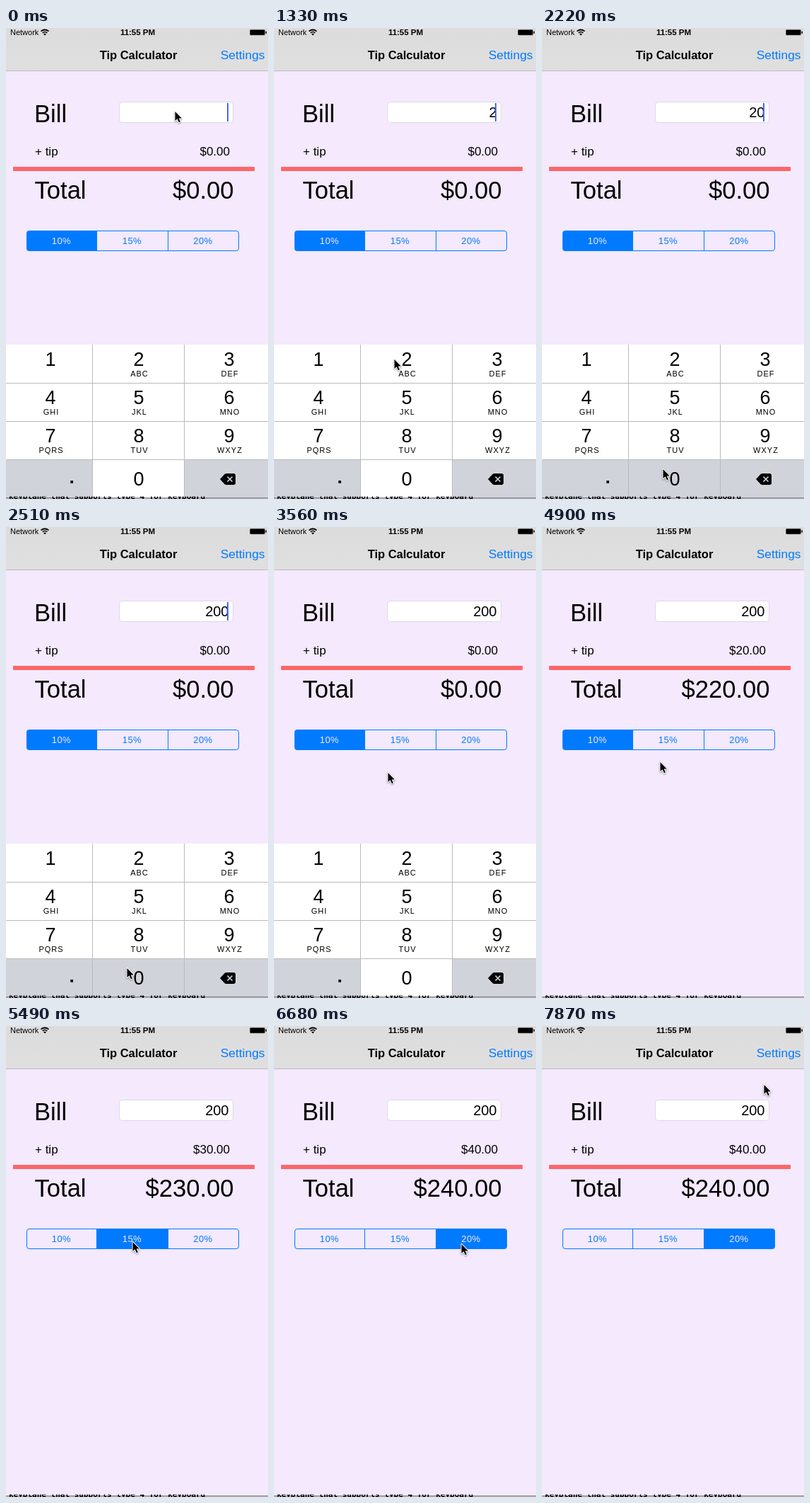
An HTML page that plays this animation: 371 px wide and 665 px high, repeating every 8 s.

```html
<!DOCTYPE html>
<html lang="en">
<head>
<meta charset="utf-8">
<title>Tip Calculator</title>
<style>
  html, body { margin: 0; width: 100%; height: 100%; overflow: hidden; background: #f4e9fd; }
  svg { display: block; width: 371px; height: 665px; font-family: "Liberation Sans", Arial, sans-serif; }
  .end { text-anchor: end; }
  .mid, .digit, .letters, .segment text { text-anchor: middle; }
  .bold { font-weight: bold; }
  .big { font-size: 34.6px; }
  .body { font-size: 17px; }
  .digit { font-size: 27px; }
  .letters { font-size: 11px; letter-spacing: 1px; }
  .segment text { font-size: 13px; letter-spacing: .4px; fill: #007aff; }
  .segment path { fill: none; }
  .segment.on path { fill: #007aff; }
  .segment.on text { fill: #f4e9fd; }
  .console { font: bold 11px "DejaVu Sans Mono", monospace; }
  #cursor { filter: drop-shadow(0 1px .8px #0006); }
</style>
</head>
<body>
<svg viewBox="0 0 371 665">
  <defs>
    <linearGradient id="barFill" x2="0" y2="1">
      <stop stop-color="#dcdcdc"/><stop offset="1" stop-color="#e0dfe0"/>
    </linearGradient>
    <clipPath id="screen"><path d="M0 0H371V663H0Z"/></clipPath>
    <clipPath id="bottomEdge"><path d="M0 661.5H371V665H0Z"/></clipPath>
    <clipPath id="pill"><rect x="29" y="286" width="301" height="29" rx="4"/></clipPath>
  </defs>
  <path d="M0 0H371V665H0Z" fill="#f4e9fd"/>

  <path d="M0 0H371V60H0Z" fill="url(#barFill)"/>
  <path d="M0 60.5H371" stroke="#bdb9c1"/>
  <text x="6" y="10" font-size="11">Network</text>
  <g fill="none" stroke="#000" stroke-width="1.7">
    <path d="M49.5 4.7Q55 .3 60.5 4.7M51.7 6.8Q55 4.2 58.3 6.8"/>
  </g>
  <path d="M55 10.5L53 8.4Q55 7 57 8.4Z"/>
  <text class="mid bold" x="186.5" y="10" font-size="11.5">11:55 PM</text>
  <rect x="345.5" y="2.5" width="21" height="7.5" rx="1.2" stroke="#555" stroke-width=".6"/>
  <path d="M367.5 4.8H369V7.8H367.5Z"/>
  <text class="mid bold" x="187.5" y="44" font-size="16.5">Tip Calculator</text>
  <text class="end" x="366.5" y="44" font-size="17.4" fill="#007aff">Settings</text>

  <text class="big" x="40" y="133">Bill</text>
  <rect x="160.5" y="104.5" width="161" height="29" rx="4" fill="#fff" stroke="#dfd8e6"/>
  <text id="bill" class="end" x="315.5" y="126" font-size="20"></text>
  <path id="caret" d="M313 106H315V132H313Z" fill="#426bf2"/>
  <text class="body" x="41" y="180">+ tip</text>
  <text id="tip" class="body end" x="317" y="180"></text>
  <path d="M10 196H352V202H10Z" fill="#fb6669"/>
  <text class="big" x="40.5" y="241">Total</text>
  <text id="total" class="big end" x="322.5" y="241"></text>

  <g id="segments" clip-path="url(#pill)"></g>
  <path d="M128.5 287V314M229.5 287V314" stroke="#007aff"/>
  <rect x="29.5" y="286.5" width="300" height="28" rx="3.5" fill="none" stroke="#007aff"/>

  <g clip-path="url(#screen)"><g id="keyboard"></g></g>
  <path d="M0 663H371V665H0Z" fill="#c5c1c9"/>
  <path d="M0 663.5H371" stroke="#77747a"/>
  <text class="console" x="4" y="664.5" clip-path="url(#bottomEdge)">keyplane that supports type 4 for keyboard</text>

  <path id="cursor" d="M.5 1V14L3.6 11.2L5.9 16.3L7.9 15.4L5.7 10.4H9.8Z"
        stroke="#fff" stroke-width="2" paint-order="stroke" stroke-linejoin="round"/>
</svg>
<script>
const LOOP = 8000, TICK = 148.2;
const $ = id => document.getElementById(id);

const segments = [[29.5, 128.5, "10%"], [128.5, 229.5, "15%"], [229.5, 329.5, "20%"]];
$("segments").innerHTML = segments.map(([left, right, label]) =>
  `<g class="segment"><path d="M${left} 286.5H${right}V314.5H${left}Z"/>
   <text x="${(left + right) / 2 - .6}" y="305">${label}</text></g>`).join("");
const segmentNodes = [...$("segments").children];

// Keyboard: three columns, four rows, gray side keys at the bottom.
const edges = [0, 122.5, 252.5, 371], centers = [63, 188, 316];
const letters = ["", "ABC", "DEF", "GHI", "JKL", "MNO", "PQRS", "TUV", "WXYZ"];
const rowTop = row => 447 + row * 54;
const keyRect = (col, row, fill, id = "") =>
  `<rect ${id && `id="${id}"`} x="${edges[col]}" y="${rowTop(row)}"
    width="${edges[col + 1] - edges[col]}" height="54" fill="${fill}"/>`;
const digit = (label, col, row, dy) =>
  `<text class="digit" x="${centers[col]}" y="${rowTop(row) + dy}">${label}</text>`;

let keys = '<path d="M0 447H371V663H0Z" fill="#fff"/>';
keys += keyRect(0, 3, "#d0d3da") + keyRect(2, 3, "#d0d3da");
keys += keyRect(1, 0, "#d0d3da", "key2") + keyRect(1, 3, "#d0d3da", "key0");
keys += '<path d="M0 501.5H371M0 555.5H371M0 609.5H371M122.5 447V663M252.5 447V663" stroke="#b9babd"/>';
letters.forEach((text, i) => {
  const col = i % 3, row = Math.floor(i / 3);
  keys += digit(i + 1, col, row, 29.5);
  keys += `<text class="letters" x="${centers[col] + 1}" y="${rowTop(row) + 45}">${text}</text>`;
});
keys += digit("0", 1, 3, 37);
keys += '<path d="M91.3 639H95V642.7H91.3Z"/>';
keys += `<path d="M303 637L309.5 630Q310.5 629 312 629H322Q325 629 325 632V642Q325 645 322 645H312Q310.5 645 309.5 644Z"/>
  <path d="M313.5 633.5L320.5 640.5M320.5 633.5L313.5 640.5" stroke="#d0d3da" stroke-width="1.7"/>`;
$("keyboard").innerHTML = keys;

// All times below are counted in ticks.
const path = [
  [0, 239, 117], [7, 170, 467], [9, 170, 467], [13, 171, 622], [18, 171, 622],
  [22, 161, 346], [31, 161, 346], [36, 179, 304], [38, 179, 304],
  [44, 265, 307], [47, 265, 307], [53, 314, 82], [60, 314, 82]
];
const bills = [[0, ""], [8, "2"], [15, "20"], [17, "200"]];
const rates = [[0, 0], [25, 10], [37, 15], [45, 20]];
const caretOff = [[4, 7], [12, 15], [20, 22], [24, 60]];
const presses = { key2: [8], key0: [15, 17] };
const SLIDE_START = 24.5;

const valueAt = (steps, tick) => steps.filter(([at]) => at <= tick).pop()[1];
const smooth = p => p * p * (3 - 2 * p);
const money = n => "$" + n.toFixed(2);

function cursorAt(tick) {
  const i = path.findIndex(([at]) => at > tick);
  const [t0, x0, y0] = path[i - 1], [t1, x1, y1] = path[i];
  const p = smooth((tick - t0) / (t1 - t0));
  return [x0 + (x1 - x0) * p, y0 + (y1 - y0) * p];
}

// Critically damped spring that carries the keyboard off the screen.
function slideAt(tick) {
  const s = 2.48 * Math.max(0, tick - SLIDE_START);
  return 217 * (1 - (1 + s) * Math.exp(-s));
}

function render(tick) {
  const rate = valueAt(rates, tick), bill = valueAt(bills, tick);
  const tip = bill * rate / 100;
  $("bill").textContent = bill;
  $("tip").textContent = money(tip);
  $("total").textContent = money(rate ? +bill + tip : 0);

  const selected = Math.max(0, rate / 5 - 2);
  segmentNodes.forEach((node, i) => node.classList.toggle("on", i === selected));

  const hidden = caretOff.some(([from, to]) => tick >= from && tick < to);
  $("caret").style.visibility = hidden ? "hidden" : "visible";
  for (const id in presses)
    $(id).style.visibility = presses[id].includes(tick) ? "visible" : "hidden";

  $("keyboard").setAttribute("transform", `translate(0 ${Math.round(slideAt(tick))})`);
  $("cursor").setAttribute("transform", `translate(${cursorAt(tick).map(Math.round)})`);
}

const start = performance.now();
function loop(now) {
  const time = Math.max(0, now - start) % LOOP;
  render(Math.min(53, Math.floor((time + 12) / TICK)));
  requestAnimationFrame(loop);
}
render(0);
requestAnimationFrame(loop);
</script>
</body>
</html>
```
